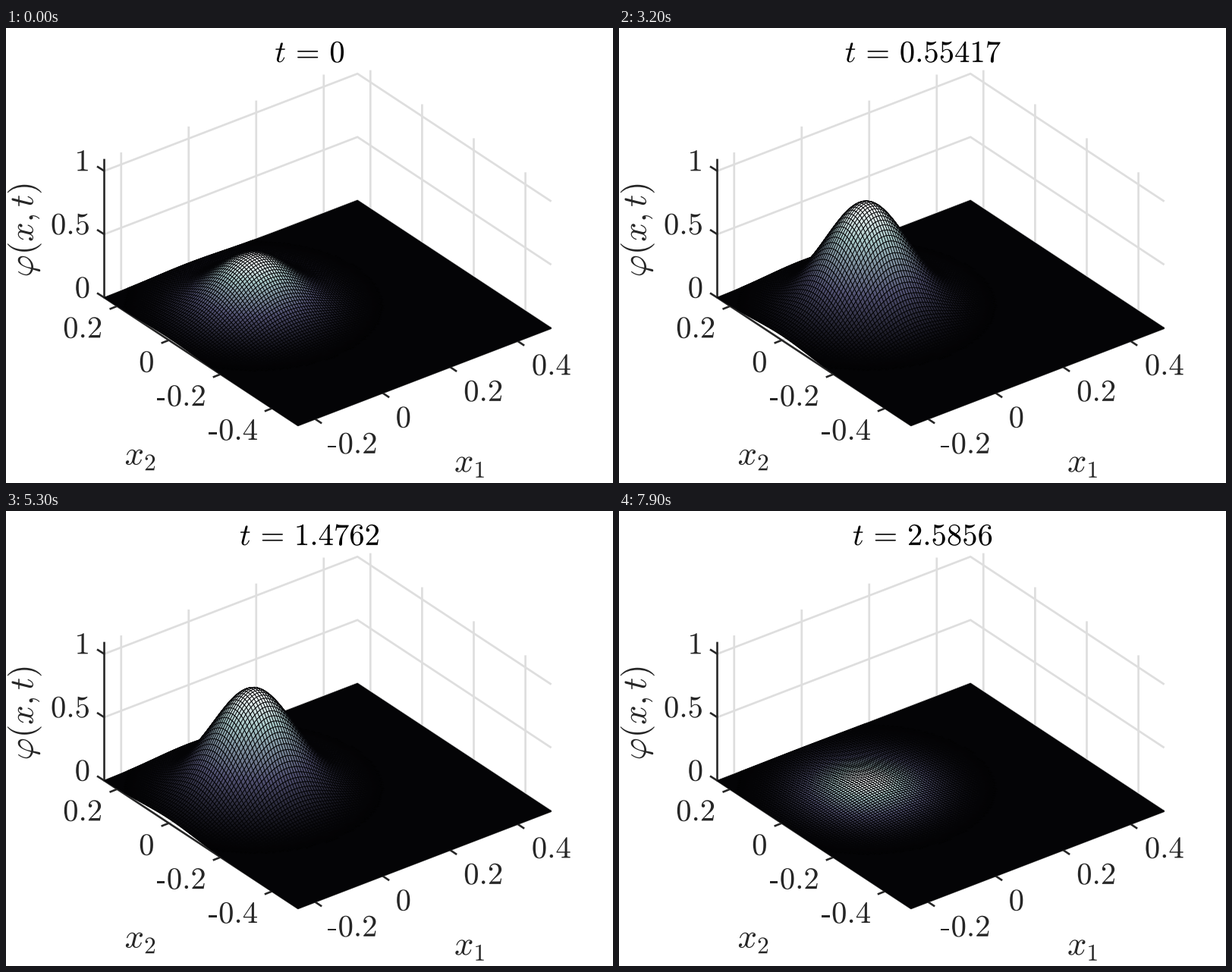
Write a matplotlib script that moves like this. It is 800x600 px and loops after 8 s.

```python
import numpy as np
import matplotlib.pyplot as plt
from matplotlib.animation import FuncAnimation
from matplotlib.collections import LineCollection, PolyCollection
from matplotlib.patches import PathPatch, Polygon
from matplotlib.path import Path
from matplotlib.textpath import TextPath
from matplotlib.transforms import Affine2D

plt.rcParams["mathtext.fontset"] = "cm"

W, H, DPI = 800, 600, 100
PX = 72 / DPI                # points per pixel
FRAMES, STEP, HOLD = 80, 100, 4
EM, LABEL_EM = 40.7, 44.8    # text sizes in pixels
LEAD = 1.768 * EM            # room for "t =" before the number
INK, GRID, DARK = "#262626", "#dedede", "#040406"
LO1, HI1, LO2, HI2, TOP = -0.25, 0.5, -0.5, 0.25, 1.095
NODES = 100

# Height of the bump over time: (time, height, slope)
KNOTS = np.array([
    (0, 0.411, 0.6), (0.292, 0.627, 0.8), (0.877, 0.983, 0.22),
    (1.476, 0.80, -0.70), (1.945, 0.443, -0.75), (2.5856, 0.08, -0.4),
])


def project(x1, x2, z=0.0):
    """Orthographic view of the box, in pixels with y downwards."""
    a, b = np.asarray(x1) - LO1, HI2 - np.asarray(x2)
    sx = 129 + 445 * a + 340.5 * b
    sy = 355 - 171 * a + 224.5 * b - 167 * np.asarray(z)
    return np.stack(np.broadcast_arrays(sx, sy), axis=-1)


def bump(x1, x2):
    return np.exp(-50 * (x1 ** 2 + x2 ** 2))


def height(t):
    i = int(np.clip(np.searchsorted(KNOTS[:, 0], t) - 1, 0, len(KNOTS) - 2))
    (t0, h0, s0), (t1, h1, s1) = KNOTS[i], KNOTS[i + 1]
    d = t1 - t0
    u = (t - t0) / d
    return ((1 + 2 * u) * (1 - u) ** 2 * h0 + u ** 2 * (3 - 2 * u) * h1
            + d * (u * (1 - u) ** 2 * s0 + u ** 2 * (u - 1) * s1))


def glyphs(s, size, x, y, turn=0):
    move = Affine2D().scale(1, -1).rotate_deg(turn).translate(x, y)
    return move.transform_path(TextPath((0, 0), f"${s}$", size=size))


def advance(num):
    return EM * sum(0.278 if c == "." else 0.5 for c in num)


def add_path(path, color=INK):
    patch = PathPatch(path, facecolor=color, lw=0, zorder=5)
    ax.add_patch(patch)
    return patch


def tick_label(s, x, y, right):
    num = s.lstrip("-")
    dash = 0.333 * EM if s != num else 0
    if right:
        x -= advance(num) + dash
    if dash:
        x0, x1 = x + 0.011 * EM, x + 0.276 * EM
        y0, y1 = y - 0.245 * EM, y - 0.187 * EM
        add_path(Path([(x0, y0), (x1, y0), (x1, y1), (x0, y1), (x0, y0)]))
    add_path(glyphs(num, EM, x + dash, y))


def lines(segs, color, width, z):
    ax.add_collection(LineCollection(segs, colors=color, linewidths=width * PX,
                                     zorder=z, capstyle="butt"))


def title_path(num):
    x = 400 - (LEAD + advance(num)) / 2
    eq = glyphs("=", EM, 0, 44.5)
    box = eq.get_extents()
    mid = x + (0.361 * EM + LEAD) / 2 - (box.x0 + box.x1) / 2
    return Path.make_compound_path(
        glyphs("t", EM, x, 44.5),
        Affine2D().translate(mid, 0).transform_path(eq),
        glyphs(num, EM, x + LEAD, 44.5))


fig = plt.figure(figsize=(W / DPI, H / DPI), dpi=DPI, facecolor="white")
ax = fig.add_axes([0, 0, 1, 1])
# whole coordinates fall on pixel centres
ax.set_xlim(-0.5, W - 0.5)
ax.set_ylim(H - 0.5, -0.5)
ax.axis("off")

# Grid on the floor and both back walls
ticks1, ticks2, ticks3 = (-0.2, 0, 0.2, 0.4), (0.2, 0, -0.2, -0.4), (0, 0.5, 1)
grid = []
for v in ticks1:
    grid.append(project([v, v, v], [LO2, HI2, HI2], [0, 0, TOP]))
for v in ticks2:
    grid.append(project([LO1, HI1, HI1], [v, v, v], [0, 0, TOP]))
for v in ticks3:
    grid.append(project([LO1, HI1, HI1], [HI2, HI2, LO2], [v, v, v]))
lines(grid, GRID, 2.7, 1)

# Axis lines and tick marks
axis = [project([LO1, LO1, LO1, HI1], [HI2, HI2, LO2, LO2], [TOP, 0, 0, 0])]
marks = []


def mark(p, dx, dy):
    marks.append([p, p + np.array([dx, dy])])


for v in ticks1:
    mark(project(v, LO2), 9, 6)
for v in ticks2:
    mark(project(LO1, v), -10, 4)
for v in ticks3:
    mark(project(LO1, HI2, v), -9.5, -6)
lines(axis + marks, INK, 2.6, 2)

for i, v in enumerate(ticks1):
    tick_label(f"{v:g}", 423.5 + 89.6 * i, 560.5 - 34.5 * i, False)
for i, v in enumerate(ticks2):
    tick_label(f"{v:g}", 126.7 + 68.3 * i, 408 + 44.9 * i, True)
for i, v in enumerate(ticks3):
    tick_label(f"{v:g}", 110.5, 355 - 83.5 * i, True)

for s, cx, y in (("x_2", 176.5, 575.5), ("x_1", 610.5, 585)):
    box = glyphs(s, LABEL_EM, 0, 0).get_extents()
    add_path(glyphs(s, LABEL_EM, cx - (box.x0 + box.x1) / 2, y))
zlabel = r"\varphi(x,t)"
box = glyphs(zlabel, LABEL_EM, 0, 0, -90).get_extents()
add_path(glyphs(zlabel, LABEL_EM, 35, 266 - (box.y0 + box.y1) / 2, -90))

# Surface: a dark sheet, with the coloured cells of the bump over it
g1, g2 = np.meshgrid(np.linspace(LO1, HI1, NODES), np.linspace(LO2, HI2, NODES),
                     indexing="ij")
shape = bump(g1, g2)
corner = shape[:-1, :-1]
keep = np.flatnonzero(corner > 0.01)
depth = (0.607 * g1 + 0.794 * g2)[:-1, :-1].ravel()
keep = keep[np.argsort(-depth[keep])]

edge = np.linspace(0, 1, 80)
rim1 = np.concatenate([LO1 + 0 * edge, LO1 + (HI1 - LO1) * edge, [HI1]])
rim2 = np.concatenate([LO2 + (HI2 - LO2) * edge, HI2 + 0 * edge, [LO2]])
rim = bump(rim1, rim2)

sheet = Polygon(project(rim1, rim2), closed=True, facecolor=DARK,
                edgecolor=DARK, lw=0.95 * PX, zorder=3)
ax.add_patch(sheet)
cells = PolyCollection([], facecolors=plt.cm.bone(corner.ravel()[keep]),
                       edgecolors=DARK, linewidths=0.85 * PX, zorder=4)
ax.add_collection(cells)
title = add_path(title_path("0"), "black")


def draw(frame):
    n = max(0, frame - HOLD)
    t = 1.5 * (1 - np.cos(np.pi * n / 99))
    h = height(t)
    p = project(g1, g2, h * shape)
    quads = np.stack([p[:-1, :-1], p[1:, :-1], p[1:, 1:], p[:-1, 1:]], axis=2)
    cells.set_verts(quads.reshape(-1, 4, 2)[keep])
    sheet.set_xy(project(rim1, rim2, h * rim))
    title.set_path(title_path(f"{t:.5g}"))
    return cells, sheet, title


anim = FuncAnimation(fig, draw, frames=FRAMES, interval=STEP, repeat=True,
                     repeat_delay=0, blit=False)
plt.show()
```
